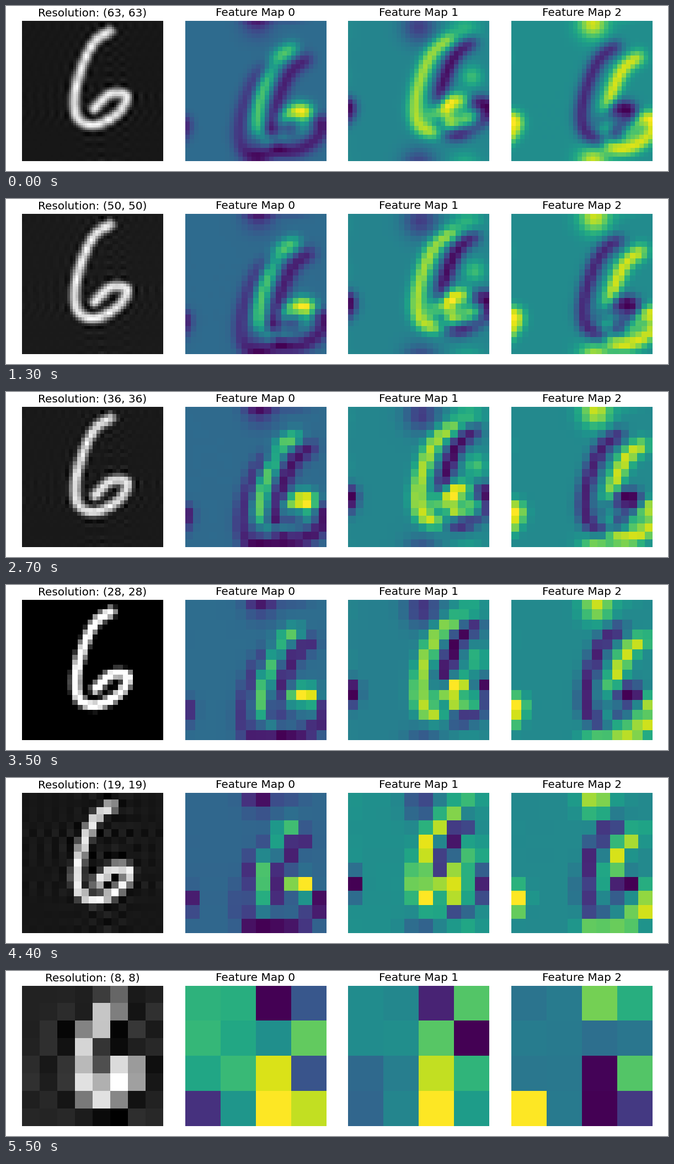
A matplotlib script for the animation above (5.6 s loop, 1200 by 300 pixels).

```python
import matplotlib.pyplot as plt
import numpy as np
from matplotlib.animation import FuncAnimation

W, H = 1200, 300
FIRST, LAST = 63, 8
SIDE = 28             # grid of the digit
SPAN = 256            # panel width, the unit of all shifts below
PANEL, PITCH = 255.6, 295.66
LEFT, BOTTOM = 29, 282.15
BLUR = 9

# Key points of the pen stroke on the digit grid
KEYS = np.array([(17.1, 2), (14.1, 4.1), (11.7, 8.9), (10.2, 15), (10.9, 19.3),
                 (14.3, 20.6), (18.8, 18.2), (20.5, 14.9), (17.4, 14.4), (14.1, 17.3)])

# Each map adds shifted echoes of the digit (dx, dy, weight)
# and a few round spots (x, y, radius, weight) to a base level.
MAPS = [
    dict(base=.34,
         echoes=[(36, 30, .8), (64, 50, -.6), (2, 58, -.45)],
         spots=[(213, 173, 14, .5), (132, 6, 20, -.3)]),
    dict(base=.45,
         echoes=[(26, 13, .7), (68, 18, -.8)],
         spots=[(174, 172, 20, .6), (225, 185, 16, .6), (130, 12, 22, -.45),
                (228, 104, 14, .35), (215, 18, 20, .3)]),
    dict(base=.48,
         echoes=[(32, 26, -.8), (75, 45, .7)],
         spots=[(150, 6, 20, .6), (205, 168, 14, -.2)]),
]


def smooth_path(keys, steps=24):
    """Catmull-Rom curve through the key points."""
    p = np.vstack([2 * keys[0] - keys[1], keys, 2 * keys[-1] - keys[-2]])
    t = np.linspace(0, 1, steps)[:, None]
    parts = [b + t * (c - a) / 2 + t**2 * (2 * a - 5 * b + 4 * c - d) / 2
             + t**3 * (3 * b - a - 3 * c + d) / 2
             for a, b, c, d in zip(p, p[1:], p[2:], p[3:])]
    return np.vstack(parts)


def draw_digit():
    yy, xx = np.mgrid[:SIDE, :SIDE]
    path = smooth_path(KEYS)
    dist = np.hypot(xx[..., None] - path[:, 0], yy[..., None] - path[:, 1])
    return np.clip(1.45 - dist.min(axis=-1), 0, 1)


def feature_field(digit, base, echoes, spots):
    ky = np.fft.fftfreq(SIDE, 1 / SIDE)[:, None]
    kx = np.arange(SIDE // 2 + 1)[None]
    spec = np.fft.rfft2(digit) * np.exp(-2 * (np.pi * BLUR / SPAN)**2 * (kx**2 + ky**2))
    soft = np.fft.irfft2(spec, s=digit.shape)
    kernel = sum(w * np.exp(-2j * np.pi * (kx * dx + ky * dy) / SPAN)
                 for dx, dy, w in echoes)
    out = np.fft.irfft2(spec * kernel, s=digit.shape) / soft.max()

    pos = np.arange(SIDE) * SPAN / SIDE + 4
    for x, y, r, w in spots:
        dx, dy = ((pos - c + SPAN / 2) % SPAN - SPAN / 2 for c in (x, y))
        out += w * np.exp(-(dx[None]**2 + dy[:, None]**2) / (2 * r * r))
    # bring peaks to 1 and troughs to 0 while the base level stays put
    return base + np.where(out > 0, out * (1 - base) / out.max(),
                           -out * base / out.min())


def resample(img, n):
    """Change the resolution by cropping or padding the spectrum."""
    spec = np.fft.rfft2(img, norm="forward")
    m = min(n, len(img))
    cols = min(n // 2 + 1, spec.shape[1])
    out = np.zeros((n, n // 2 + 1), complex)
    out[:m // 2, :cols] = spec[:m // 2, :cols]
    out[-m // 2:, :cols] = spec[-m // 2:, :cols]
    return np.fft.irfft2(out, s=(n, n), norm="forward")


digit = draw_digit()
fields = [feature_field(digit, **m) for m in MAPS]

plt.rcParams.update({"font.family": "DejaVu Sans", "font.size": 12})
fig = plt.figure(figsize=(W / 100, H / 100), dpi=100, facecolor="white")
images, titles = [], []
for k in range(4):
    ax = fig.add_axes([(LEFT + PITCH * k) / W, 1 - BOTTOM / H, PANEL / W, PANEL / H])
    ax.axis("off")
    images.append(ax.imshow(np.zeros((2, 2)), cmap="viridis" if k else "gray",
                            interpolation="nearest", aspect="auto",
                            extent=(0, 1, 1, 0)))
    titles.append(ax.set_title(f"Feature Map {k - 1}"))


def update(i):
    n = FIRST - i
    pictures = [resample(digit, n)] + [resample(f, n)[::2, ::2] for f in fields]
    for im, data in zip(images, pictures):
        im.set_data(data)
        im.set_clim(data.min(), data.max())
    titles[0].set_text(f"Resolution: ({n}, {n})")
    return images + titles


anim = FuncAnimation(fig, update, frames=FIRST - LAST + 1, interval=100,
                     repeat=True, repeat_delay=0, blit=False)
plt.show()
```
